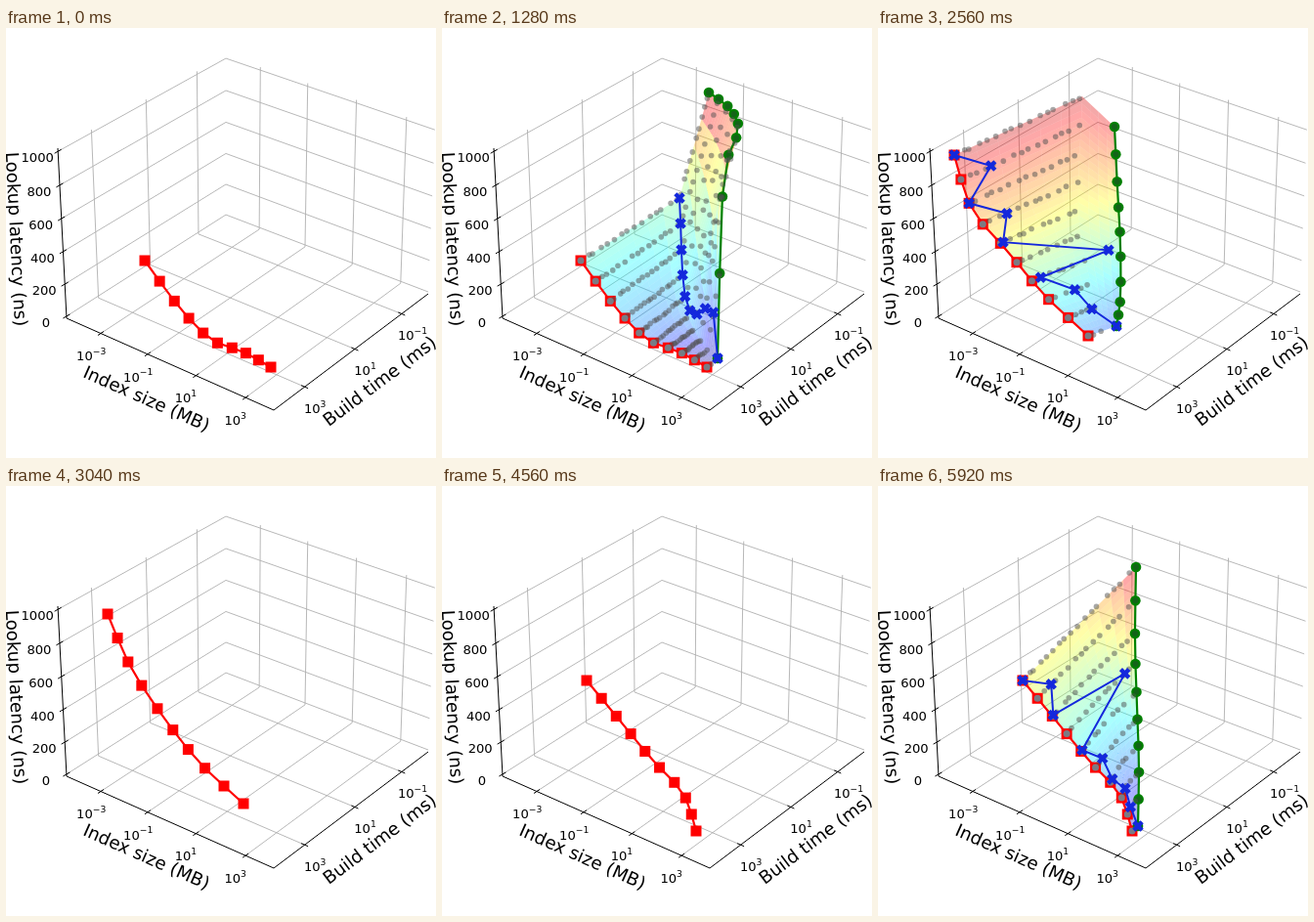
Write an HTML page with a canvas that moves like this. It is 440x440 px and loops after 6000 ms.

```html
<!DOCTYPE html>
<html lang="en">
<head>
<meta charset="utf-8">
<title>Lookup trade-off surfaces</title>
<style>
  html, body { margin: 0; width: 100%; height: 100%; overflow: hidden; background: #fff; }
  canvas { display: block; }
</style>
</head>
<body>
<canvas id="stage" width="440" height="440"></canvas>
<script>
const ctx = document.getElementById('stage').getContext('2d');
const LAST = 9, BEND = 0.6, STEP = 500, LEAD = 25;

const points = text => text.split(' ').map(p => p.split(',').map(Number));
const mix = (a, b, t) => a.map((v, k) => v + (b[k] - v) * t);
const noise = n => { const s = Math.sin(n * 12.9898) * 43758.5453; return s - Math.floor(s) - 0.5; };

// Where the blue path crosses each row: 0 is the red end, 1 the green end
const ridge = row => 0.6 + 0.4 * (row / LAST) ** 6;
const zigzag = peak => row =>
  Math.min(1, (row / LAST) ** 6 + 0.15 * (row % 2) + 0.7 * Math.exp(-4 * (row - peak) ** 2));

// Evenly spaced key points of the red edge, the green edge and the fold between them
const scenes = [
  { red: '142,238 176,284 209,318 242,331 271,347',
    green: '273,66 294,82 303,105 288,158 282,338',
    fold: '243,174 250,286 278,341', levels: [0.42, 0], reach: 1, pick: ridge },
  { red: '78,130 96,185 134,230 170,273 215,315',
    green: '242,101 245,164 248,221 248,276 244,305',
    fold: '209,70 206,199 230,310', levels: [0.92, 0.22], reach: BEND, pick: zigzag(5) },
  { red: '104,131 128,186 163,239 199,284 243,325',
    green: '262,98 264,169 265,232 265,279 264,323',
    fold: '229,68 228,212 254,324', levels: [0.92, 0.1], reach: BEND, pick: zigzag(0) },
  { red: '148,199 182,240 215,280 247,315 260,353',
    green: '264,83 263,159 265,225 267,286 266,348',
    fold: '212,135 244,245 263,350', levels: [0.62, 0.05], reach: 0.95, pick: zigzag(3) }
].map(s => ({ ...s, red: points(s.red), green: points(s.green), fold: points(s.fold) }));

// Catmull-Rom curve through the keys, row running from 0 to LAST
function curve(keys, row) {
  const n = keys.length - 1, pos = row / LAST * n, i = Math.min(n - 1, Math.floor(pos)), t = pos - i;
  const b = keys[i], c = keys[i + 1], a = keys[i - 1] || mix(c, b, 2), d = keys[i + 2] || mix(b, c, 2);
  return b.map((v, k) => v + 0.5 * t * (c[k] - a[k]
    + t * (2 * a[k] - 5 * v + 4 * c[k] - d[k] + t * (3 * (v - c[k]) + d[k] - a[k]))));
}

function surfacePoint(s, row, u) {
  const fold = curve(s.fold, row);
  return u < BEND ? mix(curve(s.red, row), fold, u / BEND)
    : mix(fold, curve(s.green, row), (u - BEND) / (1 - BEND));
}

const everyRow = point => Array.from({ length: LAST + 1 }, (_, row) => point(row));

function jet(z) {
  const band = c => Math.round(255 * Math.max(0, Math.min(1, 1.5 - Math.abs(4 * z - c))));
  return `rgba(${band(3)},${band(2)},${band(1)},0.34)`;
}

function trace(pts) {
  ctx.beginPath();
  pts.forEach(p => ctx.lineTo(...p));
}

function polyline(pts, color, width) {
  trace(pts);
  ctx.strokeStyle = color;
  ctx.lineWidth = width;
  ctx.stroke();
}

function disc([x, y], r, color) {
  ctx.beginPath();
  ctx.arc(x, y, r, 0, 2 * Math.PI);
  ctx.fillStyle = color;
  ctx.fill();
}

function label(text, x, y, size, angle = 0, align = 'center') {
  ctx.save();
  ctx.translate(x, y);
  ctx.rotate(angle * Math.PI / 180);
  ctx.font = `${size}px "DejaVu Sans", sans-serif`;
  ctx.fillStyle = '#000';
  ctx.textAlign = align;
  ctx.fillText(text, 0, size * 0.365);
  const width = ctx.measureText(text).width;
  ctx.restore();
  return width;
}

function powerLabel(exp, x, y) {
  const left = x - 8.5 - 3.2 * exp.length;
  const width = label('10', left, y + 1, 13.1, 0, 'left');
  label(exp, left + width, y - 4, 9.2, 0, 'left');
}

function drawAxes() {
  const [left, front, right, back] = points('62,297 274,391 432,272 225,193');
  const [leftTop, rightTop, backTop] = points('53,123 439,101 225,28');
  const grid = pts => polyline(pts, '#b0b0b0', 0.9);
  const tick = ([x, y], dx, dy) => polyline([[x - dx, y - dy], [x + dx, y + dy]], '#000', 1);
  const level = (low, high, g) => {
    const [x, y] = mix(low, high, g);
    return [x, y + 6 * g * (1 - g)];
  };

  for (let k = 0; k < 6; k++) {
    const g = 0.012 + 0.194 * k, p = level(left, leftTop, g);
    grid([p, level(back, backTop, g), level(right, rightTop, g)]);
    tick(p, 3.5, -2);
    label(200 * k, p[0] - 21, p[1] + 6, 13.1);
  }
  ['−3', '−1', '1', '3'].forEach((exp, k) => {
    const f = 0.165 + 0.223 * k + 0.0033 * k * k, p = mix(left, front, f);
    grid([p, mix(back, right, f), mix(backTop, rightTop, f)]);
    tick(p, 3, -2);
    powerLabel(exp, p[0] - 10, p[1] + 22);
  });
  ['−1', '1', '3'].forEach((exp, k) => {
    const f = 0.172 + 0.292 * k + 0.011 * k * k, p = mix(right, front, f);
    grid([p, mix(back, left, f), mix(backTop, leftTop, f)]);
    tick(p, 3.5, 1.5);
    powerLabel(exp, p[0] + 11, p[1] + 21);
  });
  polyline([leftTop, left, front, right], '#000', 1);
  label('Lookup latency (ns)', 11, 216, 18.2, 87);
  label('Index size (MB)', 144, 379, 18.2, 23.9);
  label('Build time (ms)', 382, 361, 18.2, -37);
}

function drawSurface(s) {
  const dv = 0.25, du = 0.1;
  for (let v = 0; v < LAST; v += dv) {
    const [low] = mix([s.levels[0]], [s.levels[1]], v / LAST);
    const high = (345 - curve(s.green, v)[1]) / 280;
    for (let k = 0; k < 10; k++) {
      const u = k * du;
      trace([[v, u], [v, u + du], [v + dv, u + du], [v + dv, u]].map(c => surfacePoint(s, ...c)));
      ctx.fillStyle = jet(low + (high - low) * (u + du / 2) ** 4);
      ctx.fill();
    }
  }
}

function drawRed(s) {
  const pts = everyRow(row => curve(s.red, row));
  polyline(pts, '#f00', 2.2);
  ctx.fillStyle = '#f00';
  pts.forEach(([x, y]) => ctx.fillRect(x - 5.5, y - 5.5, 11, 11));
}

function drawGreen(s) {
  const pts = everyRow(row => curve(s.green, row));
  polyline(pts, '#008000', 2.2);
  pts.forEach(p => { disc(p, 5.3, '#008000'); disc(p, 3, 'rgba(40,70,50,0.5)'); });
}

function drawDots(s) {
  for (let row = 0; row <= LAST; row++) {
    const ends = [0, BEND, s.reach].map(u => surfacePoint(s, row, u));
    const length = Math.hypot(ends[1][0] - ends[0][0], ends[1][1] - ends[0][1])
      + Math.hypot(ends[2][0] - ends[1][0], ends[2][1] - ends[1][1]);
    const count = Math.ceil(length / 10);
    for (let k = 1; k <= count; k++) {
      const n = row * 30 + k;
      const [x, y] = surfacePoint(s, row, s.reach * (k + 0.6 * noise(n)) / (count + 0.3));
      disc([x, y + 2 * noise(n + 300)], 2.8, 'rgba(80,80,80,0.5)');
    }
    disc(ends[0], 3.5, 'rgba(110,135,145,0.9)');
  }
}

function drawPicks(s) {
  const pts = everyRow(row => surfacePoint(s, row, s.pick(row)));
  const blue = '#1428dc', r = 4.2;
  polyline(pts, blue, 2);
  pts.forEach(([x, y]) => [-r, r].forEach(d => polyline([[x - r, y - d], [x + r, y + d]], blue, 4.4)));
}

function draw(time) {
  const step = Math.floor((time + LEAD) / STEP) % (scenes.length * 3);
  const scene = scenes[Math.floor(step / 3)], stage = step % 3;
  ctx.fillStyle = '#fff';
  ctx.fillRect(0, 0, 440, 440);
  drawAxes();
  if (stage > 0) drawSurface(scene);
  drawRed(scene);
  if (stage > 0) { drawGreen(scene); drawDots(scene); }
  if (stage > 1) drawPicks(scene);
}

const start = performance.now();
function animate() {
  draw(performance.now() - start);
  requestAnimationFrame(animate);
}
animate();
</script>
</body>
</html>
```
